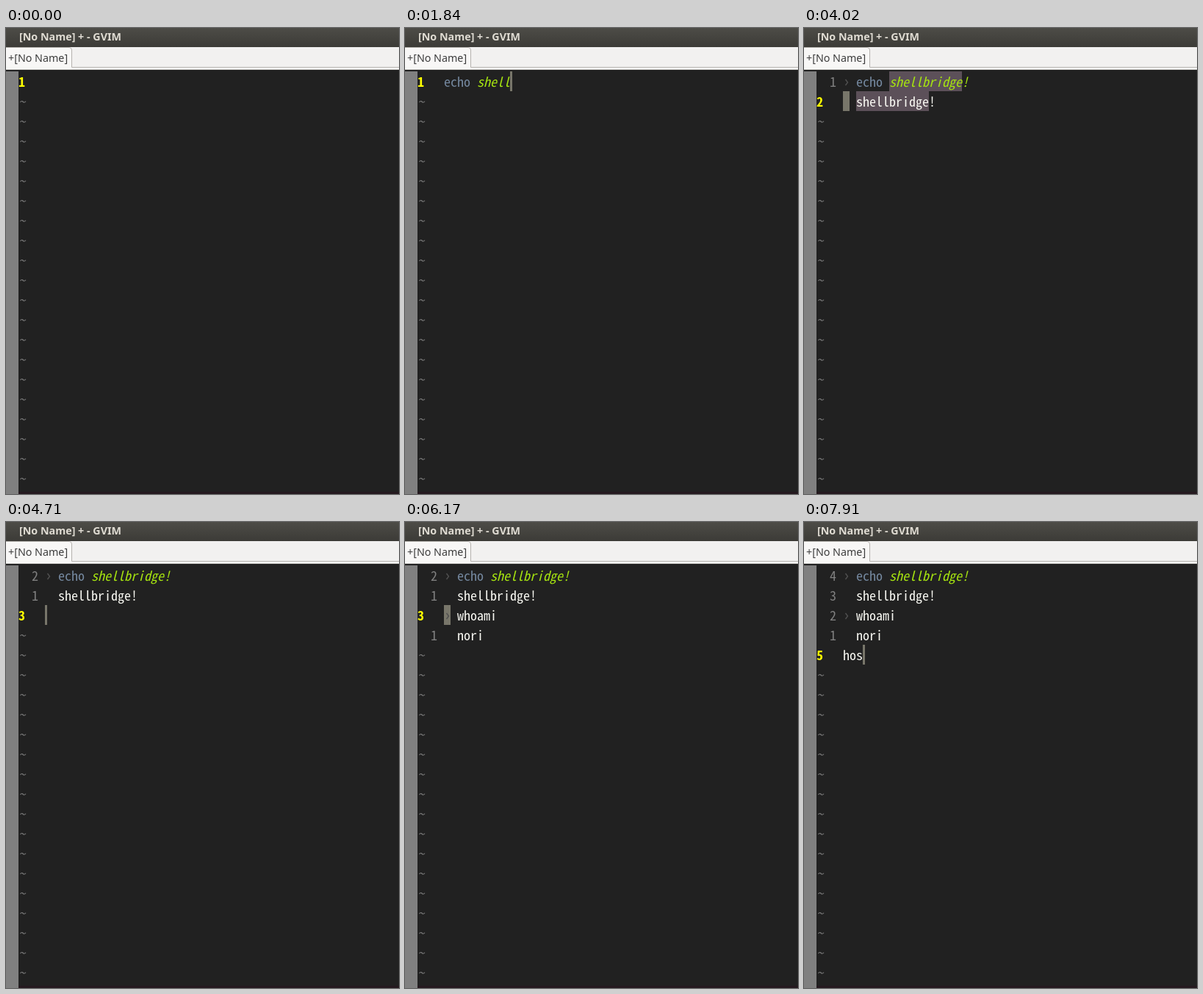
Animation, 535 px wide and 634 px high, one loop 7.99 s. Source, as an HTML page with a canvas:

```html
<!DOCTYPE html>
<html lang="en">
<head>
<meta charset="utf-8">
<title>Shell in an editor</title>
<style>
  html, body { margin: 0; width: 100%; height: 100%; overflow: hidden; background: #212121; }
  canvas { display: block; }
</style>
</head>
<body>
<canvas id="stage" width="535" height="634"></canvas>
<script>
const g = document.getElementById('stage').getContext('2d', { alpha: false });
const LOOP = 7990, W = 535, H = 634;
const CELL = 9, ROW = 27, LEFT = 53, TOP = 59, ROWS = 21;
const MONO = '18px "Noto Sans Mono CJK JP", "Noto Sans CJK JP", "Noto Sans Mono", monospace';
const SANS = '14.3px "Noto Sans", "Open Sans", sans-serif';
const WHITE = '#f8f8f2', GREY = '#808080', GREEN = '#a6e410', SLATE = '#7589a0';

// Timeline: each step is a time and the full editor state from then on.
let state = { lines: [''], row: 0, col: 0, on: false, block: false, word: '' };
const steps = [[0, state]];

function at(t, patch) {
  state = { ...state, ...patch };
  steps.push([t, state]);
}

function blink(t, on) { at(t, { on }); }

function type(from, to, chars) {
  [...chars].forEach((c, i) => {
    const line = state.lines[state.row] + c;
    const t = from + (to - from) * i / Math.max(1, chars.length - 1);
    at(t, { lines: [...state.lines.slice(0, -1), line], col: line.length, on: true });
  });
}

// Runs the last line as a command: adds the prompt mark and the output.
function run(t, output) {
  const before = state.lines.slice(0, -1), command = state.lines.at(-1);
  at(t, { lines: [...before, '› ' + command, '  ' + output], col: 0, block: true, on: true });
}

function selectOutput(t, word) { at(t, { row: state.row + 1, word }); }

function openLine(t, ready) {
  at(t, { lines: [...state.lines, ''], row: state.lines.length, on: false });
  at(ready, { word: '', block: false, col: 2, on: true });
}

blink(210, true);
blink(590, false);
blink(830, true);
type(906, 1210, 'echo ');
type(1390, 1840, 'shell');
type(2020, 2320, 'brid');
blink(2550, false);
type(2590, 2630, 'ge');
blink(2950, false);
type(2990, 2990, '!');
blink(3240, false);
run(3710, 'shellbridge!');
selectOutput(4020, 'shellbridge');
openLine(4210, 4250);
at(4710, { col: 0 });
blink(4890, false);
type(4947, 5060, 'who');
blink(5260, false);
type(5310, 5410, 'ami');
blink(5690, false);
run(6170, 'nori');
selectOutput(6480, 'nori');
openLine(7060, 7100);
at(7550, { col: 0 });
blink(7770, false);
type(7817, 7910, 'hos');

function box(x, y, w, h, color) {
  g.fillStyle = color;
  g.fillRect(x, y, w, h);
}

function text(str, x, y, font, color) {
  g.font = font;
  g.fillStyle = color;
  g.fillText(str, x, y);
}

// Text on the character grid.
function cells(str, x, row, color, style = '') {
  [...str].forEach((c, i) =>
    text(c, x + i * CELL, TOP + row * ROW + 21, style + ' ' + MONO, color));
}

function drawFrame() {
  const bar = g.createLinearGradient(0, 0, 0, 26);
  bar.addColorStop(0, '#4d4c47');
  bar.addColorStop(1, '#3c3b37');
  box(0, 0, W, 26, bar);
  text('[No Name] + - GVIM', 18, 17, 'bold ' + SANS, '#dfdbd2');

  box(0, 26, W, 31, '#f2f1f0');
  box(0, 54, W, 2, '#f9f8f7');
  box(0, 56, W, 1, '#c8c6c3');
  g.beginPath();
  g.moveTo(0, 26.5);
  g.lineTo(86, 26.5);
  g.quadraticCurveTo(89.5, 26.5, 89.5, 30);
  g.lineTo(89.5, 53.5);
  g.lineTo(0, 53.5);
  g.fillStyle = '#f8f7f6';
  g.fill();
  g.beginPath();
  g.moveTo(0, 26.5);
  g.lineTo(86, 26.5);
  g.quadraticCurveTo(89.5, 26.5, 89.5, 30);
  g.lineTo(89.5, 53.5);
  g.lineTo(W, 53.5);
  g.lineWidth = 1;
  g.strokeStyle = '#b5b2ae';
  g.stroke();
  text('+[No Name]', 3, 46, SANS, '#3c3c3c');

  box(0, 57, W, H - 57, '#212121');
  box(0, TOP, 17, H - TOP, GREY);
  box(17, 631, W - 17, 3, '#25191f');
}

function drawChevron(row) {
  const y = TOP + row * ROW + 15;
  g.beginPath();
  g.moveTo(56.5, y - 4);
  g.lineTo(59.5, y);
  g.lineTo(56.5, y + 4);
  g.lineWidth = 1.4;
  g.strokeStyle = '#505050';
  g.stroke();
}

function drawLine(line, row, s) {
  const y = TOP + row * ROW;
  const hit = s.word ? line.indexOf(s.word) : -1;
  if (hit >= 0) box(LEFT + hit * CELL, y, s.word.length * CELL, ROW, '#5c5059');

  if (row === s.row) {
    cells(String(row + 1), 17, row, '#ffff00', 'bold');
    if (s.on) box(LEFT + s.col * CELL, y, s.block ? CELL : 3, ROW, '#78766a');
  } else {
    cells(String(Math.abs(row - s.row)), 35, row, GREY);
  }

  if (line[0] === '›') drawChevron(row);
  const indent = /^[› ] /.test(line) ? 2 : 0;
  const body = line.slice(indent), x = LEFT + indent * CELL;
  if (body.startsWith('echo')) {
    cells('echo', x, row, SLATE);
    cells(body.slice(4), x + 4 * CELL, row, GREEN, 'italic');
  } else {
    cells(body, x, row, WHITE);
  }
}

function draw() {
  const t = performance.now() % LOOP;
  const s = steps.findLast(step => step[0] <= t)[1];
  drawFrame();
  s.lines.forEach((line, row) => drawLine(line, row, s));
  for (let row = s.lines.length; row < ROWS; row++) cells('~', 17, row, '#757575', 'italic');
  requestAnimationFrame(draw);
}
draw();
</script>
</body>
</html>
```
